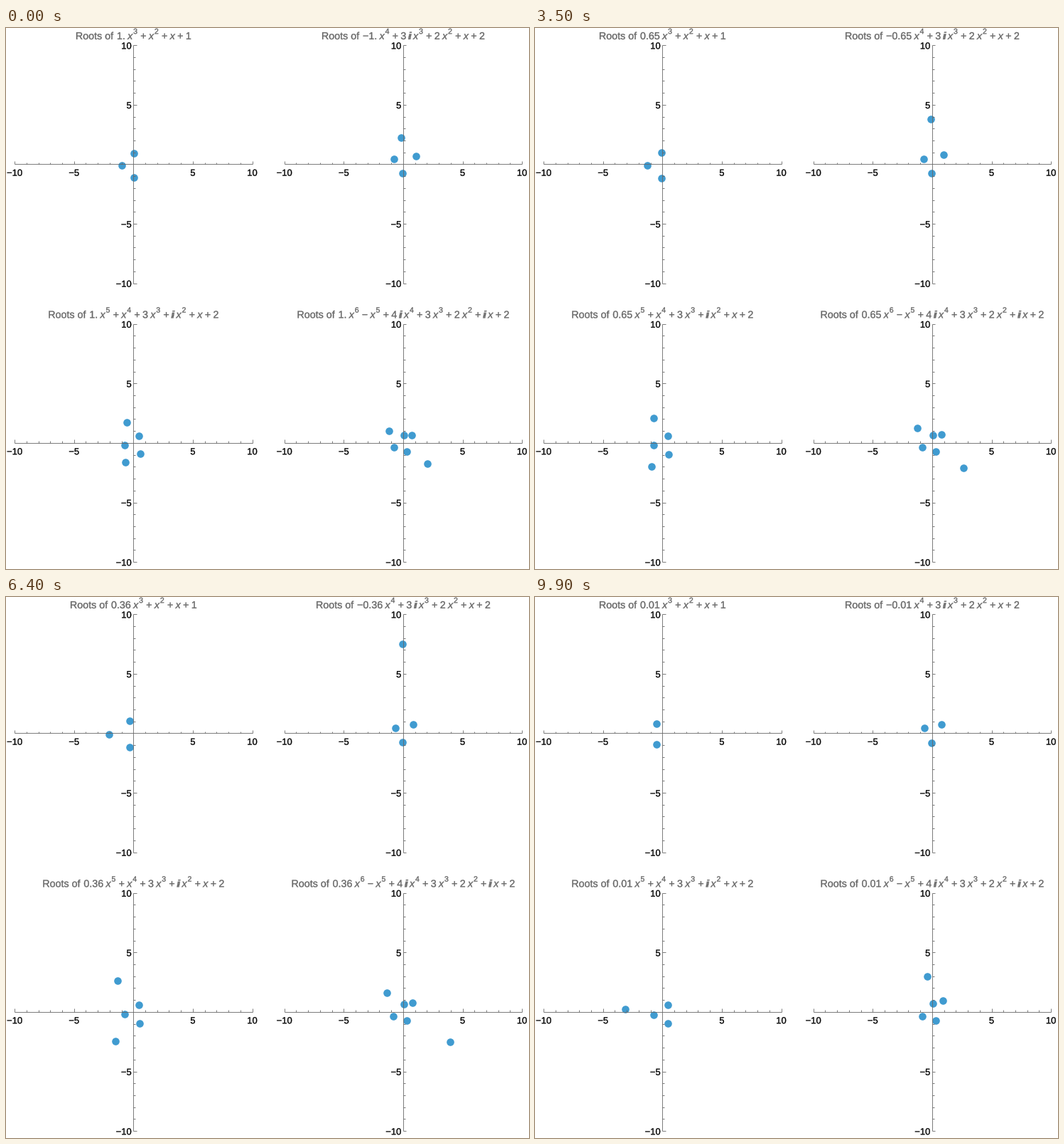
A matplotlib script that plays this animation: 736 px wide and 760 px high, repeating every 10 s.

```python
import numpy as np
import matplotlib.pyplot as plt
from matplotlib.animation import FuncAnimation
from matplotlib.collections import LineCollection
from matplotlib.patches import PathPatch, Rectangle
from matplotlib.path import Path
from matplotlib.textpath import TextPath
from matplotlib.transforms import Affine2D

W, H, DPI = 736, 760, 100
UNIT = 16.72            # pixels per plot unit
SPAN = 10 * UNIT
LABEL, TITLE = 13, 14.3
DOT = 10.6
FRAMES = 100

UPRIGHT = {"family": "Liberation Sans"}
ITALIC = {"family": "Liberation Sans", "style": "italic"}

# formula spacing in em
OP_PAD, THIN, SCRIPT_PAD = 0.233, 0.23, 0.06

# axis origin, coefficients after the leading one, leading sign, title
PANELS = [
    ((179.3, 191.4), [1, 1, 1], 1, "x^3 + x^2 + x + 1"),
    ((558.9, 191.4), [3j, 2, 1, 2], -1, "x^4 + 3 i x^3 + 2 x^2 + x + 2"),
    ((179.3, 582.9), [1, 3, 1j, 1, 2], 1,
     "x^5 + x^4 + 3 x^3 + i x^2 + x + 2"),
    ((558.9, 582.9), [-1, 4j, 3, 2, 1j, 2], 1,
     "x^6 \u2212 x^5 + 4 i x^4 + 3 x^3 + 2 x^2 + i x + 2"),
]

fig = plt.figure(figsize=(W / DPI, H / DPI), dpi=DPI, facecolor="white")
ax = fig.add_axes([0, 0, 1, 1])
ax.set(xlim=(0, W), ylim=(0, H))
ax.axis("off")

widths = {}


def px(n):
    return n * 72 / DPI


def bar_left(s, font):
    """Left edge of a bar set right after s, at size 100."""
    path = TextPath((0, 0), s + "|", size=100, prop=font)
    return path.vertices[-6:, 0].min()


def advance(s, size, font=UPRIGHT):
    key = s, font is ITALIC
    if key not in widths:
        widths[key] = (bar_left(s, font) - bar_left("", font)) / 100
    return widths[key] * size


class Line:
    """Glyph runs set one after another from a pen position."""

    def __init__(self):
        self.x, self.parts = 0, []

    def put(self, s, size, font=UPRIGHT, rise=0):
        self.parts.append(TextPath((self.x, rise), s, size=size, prop=font))
        self.x += advance(s, size, font)

    def path(self, x, y, align):
        move = Affine2D().translate(x - align * self.x, y)
        return move.transform_path(Path.make_compound_path(*self.parts))


def add_text(path, color):
    # a hairline outline gives the slightly heavy look of smoothed type
    return ax.add_patch(PathPatch(path, fc=color, ec=color, lw=px(0.35),
                                  zorder=3))


def formula(text):
    em, line = TITLE, Line()
    line.put("Roots of ", em)
    line.x += 0.06 * em
    after_factor = False
    for tok in text.split():
        if tok in "+\u2212":
            line.x += OP_PAD * em
            line.put(tok, em)
            line.x += OP_PAD * em
            after_factor = False
            continue
        if after_factor:
            line.x += THIN * em
        after_factor = True
        base, _, power = tok.partition("^")
        if base == "i":
            # double-struck: two stems side by side
            for shift in (-0.05, 0.07):
                line.parts.append(TextPath((line.x + shift * em, 0), "i",
                                           size=em, prop=ITALIC))
            line.x += advance("i", em, ITALIC)
            continue
        line.put(base, em, ITALIC if base == "x" else UPRIGHT)
        if power:
            line.x += SCRIPT_PAD * em
            line.put(power, 0.74 * em, rise=0.54 * em)
            line.x += SCRIPT_PAD * em
    return line


def label(s, x, y, align):
    line = Line()
    line.put(s, LABEL)
    add_text(line.path(x, y, align), "black")


def draw_axes(ox, oy):
    segs = [[(ox - SPAN, oy), (ox + SPAN, oy)],
            [(ox, oy - SPAN), (ox, oy + SPAN)]]
    for n in range(-10, 11):
        if n == 0:
            continue
        size, d = (4.5 if n % 5 == 0 else 2.7), n * UNIT
        segs += [[(ox + d, oy), (ox + d, oy + size)],
                 [(ox, oy + d), (ox + size, oy + d)]]
        if n % 5 == 0:
            s = str(n).replace("-", "\u2212")
            label(s, ox + d, oy - 16.3, 0.5)
            label(s, ox - 2.6, oy + d - 5.2, 1)
    ax.add_collection(LineCollection(segs, colors="#666666", lw=px(1),
                                     alpha=0.85, zorder=2))


class Panel:
    def __init__(self, origin, tail, sign, text):
        self.ox, self.oy = origin[0], H - origin[1]
        self.tail, self.sign, self.text = tail, sign, text
        draw_axes(self.ox, self.oy)
        self.dots = ax.scatter([], [], s=px(DOT) ** 2, c="#409bd0",
                               lw=0, zorder=1)
        box = Rectangle((self.ox - SPAN, self.oy - SPAN), 2 * SPAN, 2 * SPAN,
                        transform=ax.transData)
        self.dots.set_clip_path(box)
        self.title = add_text(Path([(0, 0)]), "#666666")

    def update(self, a):
        z = np.roots([self.sign * a] + self.tail)
        self.dots.set_offsets(np.c_[self.ox + 0.4 + UNIT * z.real,
                                    self.oy - 1.5 + UNIT * z.imag])
        num = "1." if a == 1 else f"{a:g}"
        if self.sign < 0:
            num = "\u2212" + num
        line = formula(f"{num} {self.text}")
        self.title.set_path(line.path(self.ox, self.oy + 175.5, 0.5))


panels = [Panel(*p) for p in PANELS]


def update(i):
    a = round(1 - i / FRAMES, 2)
    for p in panels:
        p.update(a)
    return []


anim = FuncAnimation(fig, update, frames=FRAMES, interval=100,
                     repeat=True, repeat_delay=0, blit=False)
plt.show()
```
